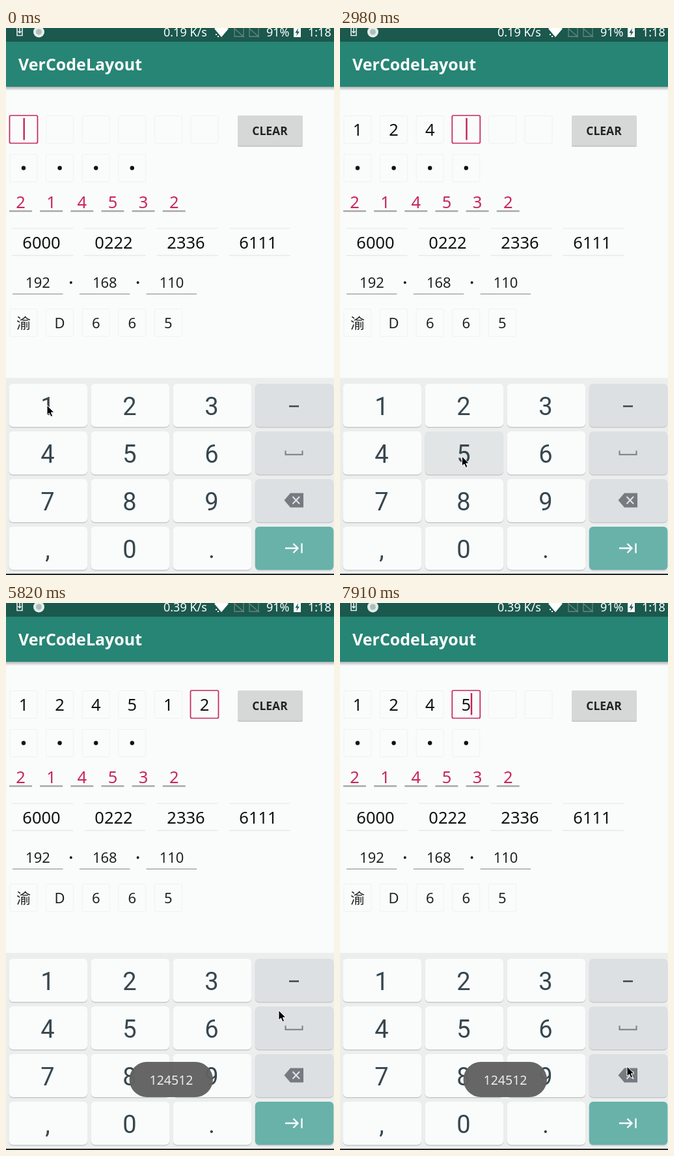
An HTML page for the animation above (8 s loop, 504x838 px).

```html
<!DOCTYPE html>
<html lang="en">
<head>
<meta charset="utf-8">
<title>VerCodeLayout</title>
<style>
html, body { margin: 0; width: 100%; height: 100%; overflow: hidden; background: #fafcfb }
svg { display: block; width: 504px; height: 838px }
text { font-family: "Noto Sans", "Noto Sans CJK SC", "Noto Sans CJK", sans-serif; text-anchor: middle }
.key { font: 38px Roboto, sans-serif; fill: #37474f }
.left { text-anchor: start }
</style>
</head>
<body>
<svg viewBox="0 0 504 838">
  <defs>
    <linearGradient id="shade" x2="0" y2="1">
      <stop stop-color="#000" stop-opacity=".3"/>
      <stop offset="1" stop-color="#000" stop-opacity="0"/>
    </linearGradient>
  </defs>
  <rect width="504" height="838" fill="#fafcfb"/>
  <rect y="90" width="504" height="6" fill="url(#shade)"/>
  <rect width="504" height="90" fill="#278575"/>
  <rect width="504" height="21" fill="#1b584d"/>

  <g fill="none" stroke="#e4eeeb" stroke-width="1.6">
    <path d="M17-2V11.5H25V-2M21 0V7M18.5 5L21 7.5L23.5 5"/>
    <circle cx="50.5" cy="6" r="6.5" fill="#aebfbb" stroke-width="4"/>
  </g>
  <g fill="#fff" font-size="18">
    <text id="speed" class="left" x="242" y="13"></text>
    <text class="left" x="400" y="13">91%</text>
    <text class="left" x="464" y="13">1:18</text>
    <path d="M320 1Q331-5 342 1L331 14ZM322 9h2v2h-2zM325 12h2v2h-2z"/>
    <path d="M442 0H453V14H442Z"/>
    <path d="M449 0L444.5 7.5H447.5L446 12.5L451 5.5H448Z" fill="#1b584d"/>
  </g>
  <g fill="none" stroke="#66877f" stroke-width="1.3">
    <path d="M351 0V13H365V0M350 0L366 14M374 0V13H388V0M373 0L389 14"/>
  </g>
  <text class="left" x="19" y="65" font-size="25" font-weight="600" fill="#fff">VerCodeLayout</text>

  <rect x="356" y="136" width="100" height="46" rx="2" fill="#c2c3c3"/>
  <rect x="356" y="134" width="100" height="46.5" rx="2" fill="#d6d7d7"/>
  <text x="405.5" y="163.5" font-size="17.5" font-weight="600" fill="#222">CLEAR</text>

  <g id="form"></g>
  <rect id="focus" y="134" width="43" height="42.5" rx="2" fill="none" stroke="#c8265f" stroke-width="1.7"/>
  <rect id="caret" y="138" width="2.4" height="33.5" fill="#c2235a"/>

  <rect y="536" width="504" height="302" fill="#eceeee"/>
  <rect y="836" width="504" height="2" fill="#22282a"/>
  <g id="keys"></g>
  <g fill="none" stroke-width="2">
    <path d="M435 579.5H450" stroke="#37474f" stroke-width="2.5"/>
    <path d="M429.5 647.5V653.5H455.5V647.5" stroke="#777e83"/>
    <path d="M427.5 723.5L437 712.5H457V734.5H437Z" fill="#757b80"/>
    <path d="M440.5 718L451 729M451 718L440.5 729" stroke="#e2e5e7"/>
    <path d="M429 797H448M441.5 790L448.5 797L441.5 804M454.5 789.5V804.5" stroke="#fff" stroke-width="2.3"/>
  </g>

  <g id="toast">
    <rect x="189.500" y="703" width="128.500" height="54" rx="27" fill="#626262" fill-opacity=".97"/>
    <text x="254" y="738" font-size="19.500" fill="#ececec">124512</text>
  </g>
  <path id="pointer" d="M0 0V15L3.500 12L6 17.500L8.700 16.300L6.300 11H11Z" fill="#000" stroke="#fff"/>
</svg>
<script>
const $ = id => document.getElementById(id);

function add(parent, tag, attrs, content = '') {
  const el = document.createElementNS('http://www.w3.org/2000/svg', tag);
  for (const name in attrs) el.setAttribute(name, attrs[name]);
  el.textContent = content;
  return $(parent).appendChild(el);
}

const text = (x, y, size, fill, content) =>
  add('form', 'text', { x, y, 'font-size': size, fill }, content);
const frame = (x, y, width) =>
  add('form', 'rect', { x, y, width, height: 42, rx: 2, fill: 'none', stroke: '#f0f2f1' });
const line = (x, y, length, stroke, width) =>
  add('form', 'path', { d: `M${x} ${y}h${length}`, stroke, 'stroke-width': width });
const dot = (cx, cy, r) => add('form', 'circle', { cx, cy, r, fill: '#111' });

const cellX = i => 27 + 55.6 * i;
const cells = [0, 1, 2, 3, 4, 5].map(i => {
  frame(cellX(i) - 21, 134.5, 42);
  return text(cellX(i), 165, 25.5, '#111', '');
});
for (let i = 0; i < 4; i++) {
  frame(cellX(i) - 21, 193.5, 42);
  dot(cellX(i), 214.5, 3.2);
  const x = 54.5 + 111 * i;
  line(x - 45, 307, 94, '#eceeee', 1.5);
  line(x - 45, 348.5, 94, '#e6e8e8', 1.5);
  text(x, 338, 25.5, '#111', ['6000', '0222', '2336', '6111'][i]);
}
[...'214532'].forEach((c, i) => {
  const x = 22.5 + 47.15 * i;
  text(x, 275.5, 25.5, '#c8265f', c);
  line(x - 17.5, 280.5, 35, '#a8a9a9', 2.5);
});
['192', '168', '110'].forEach((c, i) => {
  const x = 49 + 102.8 * i;
  text(x, 398, 22, '#222', c);
  line(x - 39, 407.5, 77.5, '#858686', 1.2);
  if (i) dot(x - 52, 390, 2);
});
[...'渝D665'].forEach((c, i) => {
  frame(cellX(i) - 21, 430.5, 42);
  text(cellX(i), 460, 22, '#222', c);
});

const keys = {};
['123-', '456_', '789<', ',0.>'].forEach((row, r) => [...row].forEach((name, c) => {
  const x = 4.5 + 126.1 * c, y = 545 + 73 * r;
  const box = { x, y, width: 120.5, height: 66, rx: 6 };
  const fill = name == '>' ? '#68b2aa' : c == 3 ? '#dde0e3' : '#fafcfc';
  add('keys', 'rect', { ...box, y: y + 1.5, fill: '#c6c9ca' });
  keys[name] = { fill, el: add('keys', 'rect', box) };
  if (c < 3) add('keys', 'text', { x: 64 + 126 * c, y: y + 47.5, class: 'key' }, name);
}));

// time, entered digits, focused cell
const states = [
  [0, '', 0], [750, '1', 1], [1650, '12', 2], [2550, '124', 3], [3000, '1245', 4],
  [3600, '12451', 5], [4150, '124512', 5], [7300, '12451', 4], [7850, '1245', 3]
];
// start, end, key
const presses = [
  [600, 750, '1'], [1500, 1650, '2'], [2400, 2550, '4'], [2900, 3000, '5'],
  [3500, 3600, '1'], [4100, 4180, '2'], [7100, 7300, '<'], [7700, 7850, '<']
];
// time, x, y
const path = [
  [0, 63, 578], [800, 64, 580], [1450, 190, 586], [1750, 193, 588], [2090, 197, 588],
  [2400, 66, 654], [2560, 66, 655], [2880, 186, 656], [3050, 188, 656], [3450, 63, 582],
  [3640, 64, 581], [4030, 182, 576], [4220, 185, 577], [4776, 302, 576], [5100, 330, 580],
  [5821, 419, 624], [6500, 440, 725], [7164, 443, 728], [7700, 442, 720], [7910, 441, 710]
];

const DURATION = 8000, STEP = 149.25;
const clamp = v => Math.min(1, Math.max(0, v));

function pointerAt(t) {
  const i = path.findIndex(p => p[0] > t);
  if (i < 0) return path[path.length - 1].slice(1);
  const [t0, x0, y0] = path[i - 1], [t1, x1, y1] = path[i];
  const u = (t - t0) / (t1 - t0), e = u * u * (3 - 2 * u);
  return [x0 + (x1 - x0) * e, y0 + (y1 - y0) * e];
}

function draw(now) {
  const t = Math.floor((now % DURATION + 12) / STEP) * STEP;
  const [since, digits, focus] = states.filter(s => s[0] <= t).pop();
  cells.forEach((cell, i) => cell.textContent = digits[i] || '');
  $('focus').setAttribute('x', cellX(focus) - 21.5);
  $('caret').setAttribute('x', cellX(focus) + (digits[focus] ? 7 : -0.5));
  $('caret').style.opacity = (t - since) % 1000 < 500 ? 1 : 0;

  const press = presses.find(p => p[0] <= t && t < p[1]);
  for (const name in keys) {
    const down = press && press[2] == name;
    keys[name].el.setAttribute('fill', down ? (name == '<' ? '#d0d2d4' : '#e2e5e6') : keys[name].fill);
  }
  $('speed').textContent = t < 5000 ? '0.19 K/s' : '0.39 K/s';
  $('toast').style.opacity = clamp((t - 4300) / 350);
  $('pointer').setAttribute('transform', `translate(${pointerAt(t)})`);
}

function loop() {
  draw(performance.now());
  requestAnimationFrame(loop);
}
loop();
</script>
</body>
</html>
```
